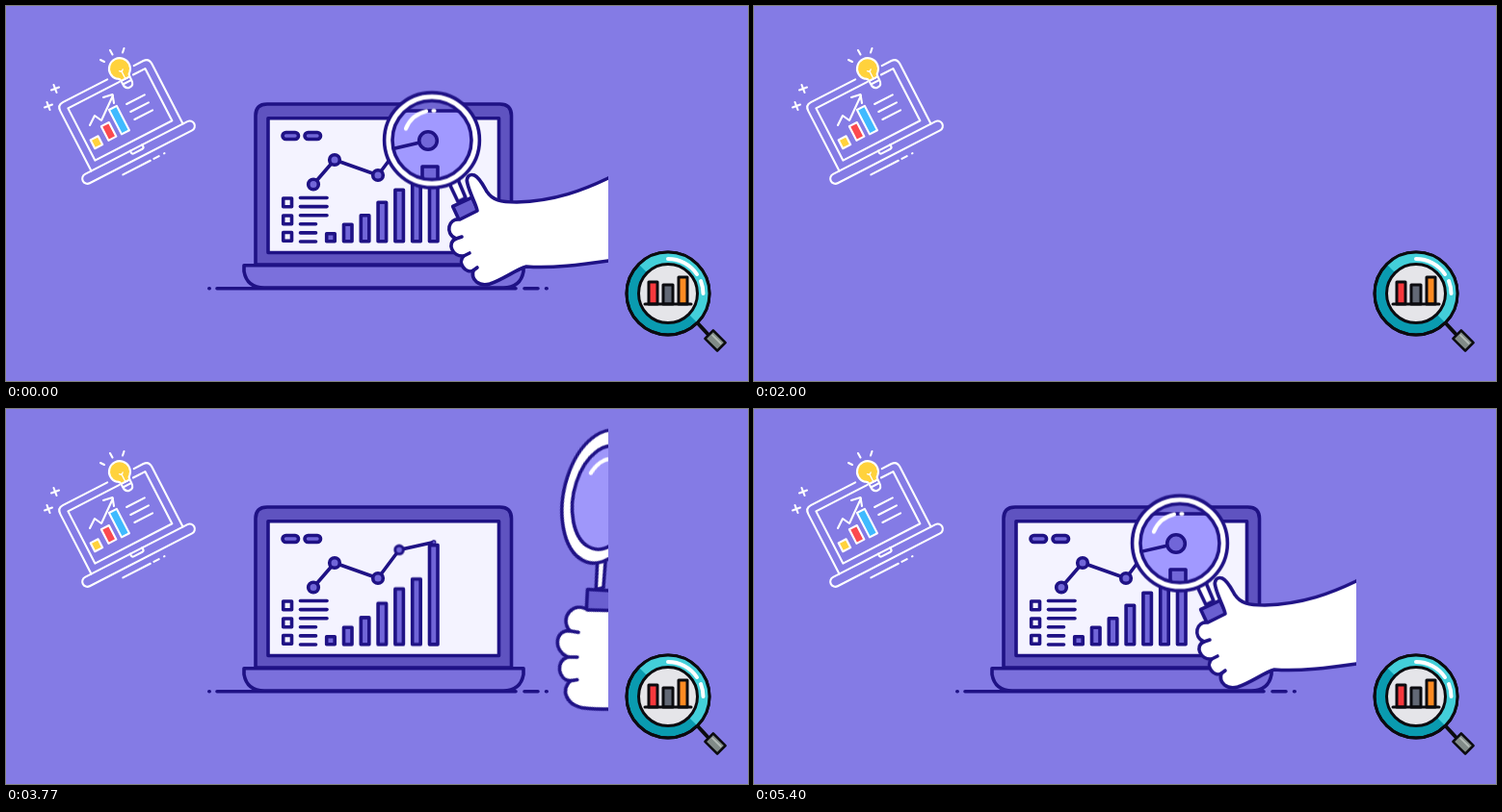
These frames come from a looping animation (770x390 px, 5.43 s). An HTML page:

```html
<!DOCTYPE html>
<html lang="en">
<head>
<meta charset="utf-8">
<title>Data analysis</title>
<style>
html, body { margin: 0; width: 100%; height: 100%; overflow: hidden; background: #847be5; }
svg { display: block; width: 770px; height: 390px; }
.ink { stroke: #1f1285; stroke-width: 3.6; stroke-linejoin: round; stroke-linecap: round; }
.line { fill: none; }
.white { fill: none; stroke: #fff; stroke-width: 2.1; stroke-linecap: round; stroke-linejoin: round; }
.black { stroke: #0b0b0f; stroke-width: 3; stroke-linejoin: round; stroke-linecap: round; }
.soft { fill: #7166d8; }

.laptop, .lid, .screen, .content, .front, .lens, .pane, .hand, .bar, .node, .draw, .trace {
  animation: 5430ms linear infinite;
}
.laptop { animation-name: lift; }
.lid { animation-name: lid; }
.screen { animation-name: screen; }
.content { animation-name: content; transform-origin: 0 246px; }
.front { animation-name: front; }
.lens { animation-name: lens; }
.pane { animation-name: pane; }
.hand { animation-name: hand; }
.lens *, .pane *, .hand * { vector-effect: non-scaling-stroke; }
.bar { animation-name: grow; transform-origin: 0 244.8px; vector-effect: non-scaling-stroke; }
.node { animation-name: pop; transform-box: fill-box; transform-origin: center; }
.draw, .trace { stroke-dasharray: 1 2; }
.draw { animation-name: draw; }
.trace { animation-name: trace; }

/* laptop */
@keyframes lift {
  0%, 22.84% { transform: translateY(0); animation-timing-function: ease-in; }
  29.47% { transform: translateY(30px); }
  42.17% { transform: translateY(30px); animation-timing-function: ease-out; }
  52.49% { transform: translateY(-41px); animation-timing-function: cubic-bezier(.5, 0, 1, 1); }
  57.64%, 100% { transform: translateY(0); }
}
@keyframes lid {
  0%, 11.79%, 51.57%, 100% {
    d: path("M259 269L259 114Q259 102 271 102L512.5 102Q524.5 102 524.5 114L524.5 269Z");
    animation-timing-function: ease-in;
  }
  16.57% {
    d: path("M258 269L256 126Q256 114 268 114L515 114Q527 114 527 126L525 269Z");
    animation-timing-function: cubic-bezier(.4, .1, .8, .8);
  }
  22.45%, 45.67% {
    d: path("M256 269L250 269Q250 269 260 269L524 269Q534 269 534 269L528 269Z");
    animation-timing-function: ease-out;
  }
}
@keyframes screen {
  0%, 11.79%, 51.57%, 100% {
    d: path("M272 116.7L511.5 116.7L511.5 256.5L272 256.5Z"); fill: #f4f3ff;
    animation-timing-function: ease-in;
  }
  16.57% {
    d: path("M270 129L515 129L511 258L273 258Z"); fill: #aaa2ff;
    animation-timing-function: cubic-bezier(.4, .1, .8, .8);
  }
  22.45%, 45.67% {
    d: path("M266 269L518 269L518 269L266 269Z"); fill: #aaa2ff;
    animation-timing-function: ease-out;
  }
}

/* chart */
@keyframes content {
  0%, 11.79% { opacity: 1; transform: scaleY(1); animation-timing-function: ease-in; }
  16.57% { opacity: .6; transform: scaleY(.85); }
  20.81% { opacity: 0; transform: scaleY(.3); }
  22%, 53% { opacity: 0; transform: scaleY(1); }
  53.05%, 100% { opacity: 1; transform: scaleY(1); }
}
@keyframes grow {
  0%, 40% { transform: scaleY(1); }
  40.01%, 54.3% { transform: scaleY(.015); animation-timing-function: ease-in-out; }
  66.11% { transform: scaleY(1.13); }
  69.06%, 100% { transform: scaleY(1); }
}
@keyframes pop {
  0%, 40% { transform: scale(1); }
  40.01%, 58.93% { transform: scale(0); }
  63.72%, 100% { transform: scale(1); }
}
@keyframes draw {
  0%, 40% { stroke-dashoffset: 0; fill-opacity: 1; }
  40.01%, 53% { stroke-dashoffset: 1; fill-opacity: 0; animation-timing-function: ease-out; }
  59% { stroke-dashoffset: 0; fill-opacity: 0; }
  61%, 100% { stroke-dashoffset: 0; fill-opacity: 1; }
}
@keyframes trace {
  0%, 40% { stroke-dashoffset: 0; }
  40.01%, 54.7% { stroke-dashoffset: 1; }
  69.06%, 100% { stroke-dashoffset: 0; }
}

/* ground: wiped away to the right, then drawn again */
@keyframes front {
  0%, 22.1% { x: 205px; width: 362px; }
  32.97% { x: 567px; width: 362px; }
  32.98% { x: 205px; width: 0; }
  37.38% { x: 205px; width: 0; animation-timing-function: ease-in-out; }
  59.3%, 100% { x: 205px; width: 362px; }
}

/* magnifier: frame, pane and hand share the same beats; the pane turns inside the frame */
@keyframes lens {
  0% { transform: translate(442px, 139.5px) rotate(0deg) scale(1, 1) rotate(0deg); animation-timing-function: ease-in; }
  10.5% { transform: translate(468px, 119px) rotate(1deg) scale(1, 1.01) rotate(4deg); }
  16.57% { transform: translate(529.5px, 63px) rotate(6deg) scale(.92, 1.08) rotate(12deg); animation-timing-function: ease-in; }
  20.3% { transform: translate(700px, 30px) rotate(12deg) scale(.85, 1.3) rotate(14deg); }
  20.31%, 65.38% { transform: translate(740px, 80px) rotate(14deg) scale(.8, 1.45) rotate(12deg); }
  69.43% { transform: translate(620px, 91px) rotate(12deg) scale(.83, 1.42) rotate(10deg); }
  73.66% { transform: translate(520px, 112px) rotate(5deg) scale(.97, 1.14) rotate(6deg); animation-timing-function: ease-out; }
  77.9% { transform: translate(455px, 134px) rotate(0deg) scale(1, 1) rotate(3deg); animation-timing-function: ease-in-out; }
  88.4% { transform: translate(424px, 157px) rotate(0deg) scale(1, 1) rotate(-2deg); animation-timing-function: ease-in-out; }
  100% { transform: translate(442px, 139.5px) rotate(0deg) scale(1, 1) rotate(0deg); }
}
@keyframes pane {
  0% { transform: translate(442px, 139.5px) rotate(0deg) scale(1, 1) rotate(0deg); animation-timing-function: ease-in; }
  10.5% { transform: translate(467px, 119px) rotate(1deg) scale(.96, 1.01) rotate(4deg); }
  16.57% { transform: translate(525px, 63px) rotate(6deg) scale(.78, 1.1) rotate(12deg); animation-timing-function: ease-in; }
  20.3% { transform: translate(695px, 30px) rotate(12deg) scale(.75, 1.25) rotate(14deg); }
  20.31%, 65.38% { transform: translate(742px, 81px) rotate(14deg) scale(.77, 1.35) rotate(12deg); }
  69.43% { transform: translate(622px, 92px) rotate(12deg) scale(.8, 1.33) rotate(10deg); }
  73.66% { transform: translate(520px, 112px) rotate(5deg) scale(.94, 1.11) rotate(6deg); animation-timing-function: ease-out; }
  77.9% { transform: translate(455px, 134px) rotate(0deg) scale(1, 1) rotate(3deg); animation-timing-function: ease-in-out; }
  88.4% { transform: translate(424px, 157px) rotate(0deg) scale(1, 1) rotate(-2deg); animation-timing-function: ease-in-out; }
  100% { transform: translate(442px, 139.5px) rotate(0deg) scale(1, 1) rotate(0deg); }
}
@keyframes hand {
  0% { transform: translate(477px, 211px) scale(1, 1) rotate(0deg); animation-timing-function: ease-in; }
  10.5% { transform: translate(497px, 195px) scale(1, 1.01) rotate(5deg); }
  16.57% { transform: translate(540.5px, 153px) scale(.97, 1.13) rotate(16deg); animation-timing-function: ease-in; }
  20.3% { transform: translate(705px, 135px) scale(1.2, 1.3) rotate(28deg); }
  20.31%, 65.38% { transform: translate(733px, 205px) scale(1.45, 1.45) rotate(32deg); }
  69.43% { transform: translate(619px, 199.5px) scale(1.44, 1.38) rotate(28deg); }
  73.66% { transform: translate(539px, 200px) scale(1.1, 1.14) rotate(12deg); animation-timing-function: ease-out; }
  77.9% { transform: translate(486px, 207px) scale(1, 1) rotate(3deg); animation-timing-function: ease-in-out; }
  88.4% { transform: translate(461px, 228px) scale(1, 1) rotate(-2deg); animation-timing-function: ease-in-out; }
  100% { transform: translate(477px, 211px) scale(1, 1) rotate(0deg); }
}
</style>
</head>
<body>
<svg viewBox="0 0 770 390" xmlns="http://www.w3.org/2000/svg">
  <defs>
    <clipPath id="above"><rect width="770" height="294.5"/></clipPath>
    <clipPath id="wipe"><rect class="front" x="205" y="285" width="362" height="20"/></clipPath>
    <clipPath id="window"><rect y="15" width="625" height="375"/></clipPath>
    <clipPath id="glass"><circle class="pane" r="41"/></clipPath>
    <clipPath id="ring"><circle cx="687" cy="299" r="43"/></clipPath>
  </defs>

  <!-- white laptop -->
  <g class="white" transform="translate(85 179) rotate(-27.3)">
    <path d="M6.500-5V-75Q6.500-82 13-82H65M96-82H107Q113.500-82 113.500-75V-5"/>
    <path d="M75-74H15V-13H105V-74H91"/>
    <rect x="-6" y="-5" width="130" height="10.500" rx="5.200"/>
    <path d="M52-5V-3Q52-1 54-1H64Q66-1 66-3V-5M34 13.500H66M70 13.500H76M82 13.500H82.500"/>
    <path d="M71-50H92M71-41H92M71-32H92"/>
    <rect x="20.500" y="-34" width="9" height="10" fill="#ffd23c"/>
    <rect x="37" y="-41.500" width="9" height="16.500" fill="#fb4a4f"/>
    <rect x="52" y="-53" width="9" height="28.500" fill="#3fbaff"/>
    <path d="M77-74V-70Q77-64 82-64T87-70V-74ZM77-70H87"/>
    <path d="M77-74Q77-77 74-78A11 11 0 1 1 89-78Q87-77 87-74Z" fill="#ffd23c"/>
    <path d="M82-75V-83M80-84L82-82L84-84" stroke-width="1.300"/>
  </g>
  <g class="white">
    <path d="M87 124L92 114L99 119L111 93M101 95L110.500 92L112 101"/>
    <path d="M98 56L102 58M108 46L110.500 50.500M122.500 44L121 48.500"/>
    <path d="M47 87.500L55 84.500M49.500 82L52.500 90M40 105.500L48 102.500M42.500 100L45.500 108"/>
  </g>

  <!-- teal magnifier -->
  <g class="black">
    <path d="M717 329L729 342" stroke-width="4"/>
    <circle cx="687" cy="299" r="43" fill="#0a9bb0"/>
    <path d="M656 268L718 330L740 299L700 240Z" fill="#43cfd9" stroke="none" clip-path="url(#ring)"/>
    <circle cx="687" cy="299" r="43" fill="none"/>
    <circle cx="687" cy="299" r="30.500" fill="#e5e5e9"/>
    <path d="M687 263A36 36 0 0 1 717 279M721 286A36 36 0 0 1 723.500 299" fill="none" stroke="#fff" stroke-width="4"/>
    <rect x="667" y="287" width="9" height="23" fill="#f8393d"/>
    <rect x="682" y="290" width="10" height="20" fill="#626875"/>
    <rect x="698" y="282" width="9" height="28" fill="#ff8b22"/>
    <path d="M663 310H711"/>
    <g transform="translate(736 348) rotate(45)">
      <rect x="-9" y="-6" width="18" height="12" fill="#818b88" stroke-width="2.500"/>
      <path d="M-6-2H6" stroke="#b3bbb7" stroke-width="2"/>
    </g>
  </g>

  <!-- desk laptop -->
  <g clip-path="url(#above)">
    <g class="laptop">
      <path class="lid ink" fill="#5f53c0" d="M259 269L259 114Q259 102 271 102L512.500 102Q524.500 102 524.500 114L524.500 269Z"/>
      <path class="screen ink" fill="#f4f3ff" d="M272 116.700L511.500 116.700L511.500 256.500L272 256.500Z"/>
      <g class="content ink" id="content"></g>
      <path class="ink" fill="#7b70dc" d="M247 269.700H537V276Q534 293 516 293H268Q250 293 247 276Z"/>
    </g>
  </g>
  <path class="ink line" clip-path="url(#wipe)" d="M210.800 293.700H211.200M219 293.700H529M538 293.700H552M560.500 293.700H561.200"/>

  <!-- magnifier in hand -->
  <g clip-path="url(#window)">
    <g class="lens ink" fill="#fff">
      <path d="M18 45L27 64L35 60L27 41Z"/>
      <circle r="49.400"/>
    </g>
    <g class="ink" clip-path="url(#glass)">
      <rect width="770" height="390" fill="#9f97fa" stroke="none"/>
      <path d="M300 260V86H537Q551 86 551 100V260Z" fill="#7066d2"/>
      <path d="M300 260V109H535V260Z" fill="#a199ff"/>
      <path class="soft" d="M432 210V167H448V210Z"/>
      <path class="line" d="M386 152L438 140"/>
      <circle class="soft" cx="438" cy="140" r="9.300"/>
    </g>
    <g class="pane ink line">
      <circle r="41"/>
      <path d="M-27-12A30 30 0 0 1-6-30M1.500-30.500H2.500" stroke="#fff" stroke-width="4.200"/>
    </g>
    <g class="hand ink">
      <rect x="-11" y="-8" width="22" height="16" fill="#6a5fd0" transform="rotate(-25)"/>
      <path fill="#fff" d="M223-62L148-32C123-20 93-8 53-7C36-7 28-9 22-18C18-25 14-33 9-35
        C3-37 0-32 2-26C5-14 11-5 12 2L-6 11C-18 9-22 26-10 31C-20 35-14 50-2 49C-9 56 0 68 8 64
        C5 74 14 81 25 78C40 73 52 63 63 60C90 62 120 58 148 54L223 46Z"/>
      <path class="line" d="M-10 31L-4 29M-2 49L4 46M8 64L12 61"/>
    </g>
  </g>
</svg>
<script>
const content = document.getElementById("content");

function add(tag, attrs, delay = 0) {
  const el = document.createElementNS("http://www.w3.org/2000/svg", tag);
  for (const key in attrs) el.setAttribute(key, attrs[key]);
  el.style.animationDelay = delay + "ms";
  content.append(el);
}

const drawn = { class: "draw soft", pathLength: 1 };
const sketched = { class: "draw line", pathLength: 1 };

[287, 310].forEach((x, i) =>
  add("rect", { ...drawn, x, y: 131.5, width: 16.5, height: 7, rx: 3.5 }, 40 - 40 * i));

[200, 218, 235.5].forEach(y =>
  add("path", { ...sketched, d: `M296.500 ${y}v8.800h-8.800v-8.800z` }));

for (let i = 0; i < 6; i++) {
  const right = i < 3 ? 333 : 321.5;
  add("path", { ...sketched, d: `M${right} ${199.5 + 9.1 * i}H305.500` }, i < 3 ? 60 : 110);
}

[8, 17.5, 27, 40.5, 53.5, 61.5, 91.5].forEach((height, i) =>
  add("rect", { class: "bar soft", x: 332.7 + 17.8 * i, y: 244.8 - height, width: 8.5, height }, 30 * i));

const points = [[319, 185.5], [341, 160], [386, 176], [408, 146.5], [444, 138.5]];
add("path", { class: "trace line", pathLength: 1, d: "M" + points.join("L") });
points.forEach(([cx, cy], i) =>
  add("circle", { class: "node soft", cx, cy, r: 5.3 }, 120 * i));
</script>
</body>
</html>
```
